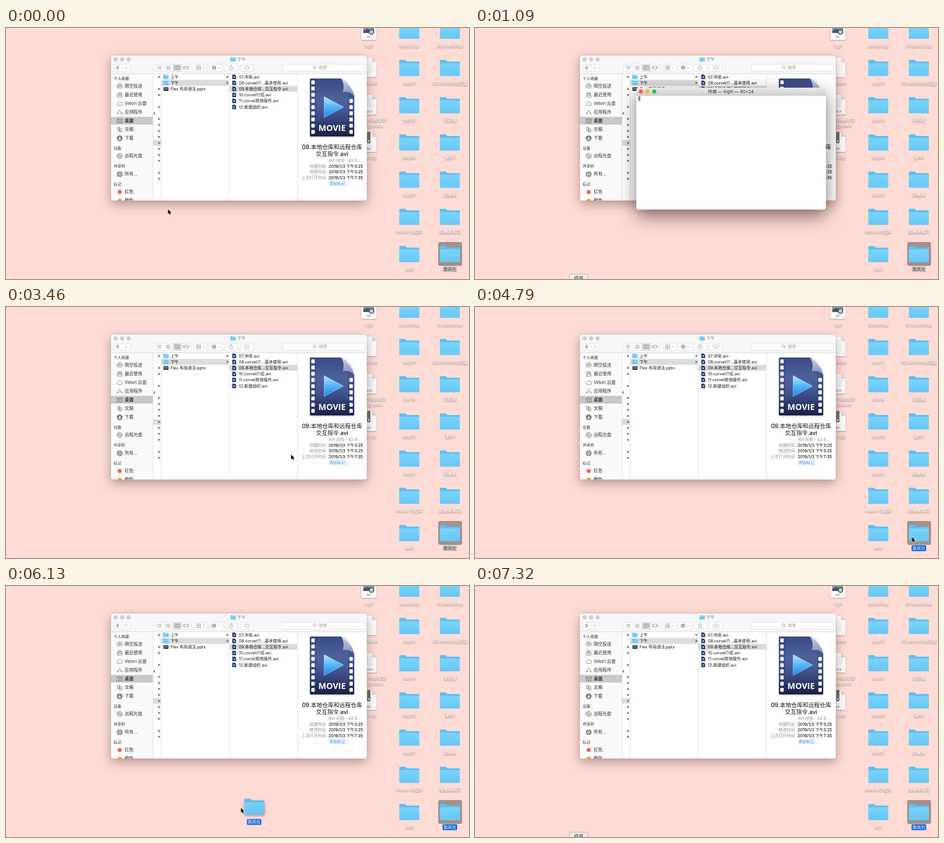
Animation of 1016x551 px, one loop 8 s. Source, as an HTML page with a canvas:

```html
<!DOCTYPE html>
<html lang="zh">
<head>
<meta charset="utf-8">
<title>Desktop</title>
<style>
html, body { margin: 0; width: 100%; height: 100%; overflow: hidden; background: #fedcd6; }
canvas { display: block; }
</style>
</head>
<body>
<canvas id="stage" width="1016" height="551"></canvas>
<script>
const c = document.getElementById('stage').getContext('2d');
const LOOP = 8000;
const SANS = 'Inter, "Noto Sans CJK SC", "Noto Sans CJK", sans-serif';
const BLUE = '#1167d8', GREY = '#7c7c7c', SOFT = '#9a9a9a';

// ---- helpers ----
function text(s, x, y, size = 9, color = '#151515', align = 'left', weight = 400, font = SANS) {
  c.font = `${weight} ${size}px ${font}`;
  c.textAlign = align;
  c.fillStyle = color;
  c.fillText(s, x, y + size * 0.36);
}
function paint(path, fill, stroke, width = 1) {
  if (fill) { c.fillStyle = fill; c.fill(path); }
  if (stroke) { c.strokeStyle = stroke; c.lineWidth = width; c.stroke(path); }
}
function box(x, y, w, h, fill, r = 0, stroke) {
  const p = new Path2D();
  p.roundRect(x, y, w, h, r);
  paint(p, fill, stroke);
}
function disc(x, y, r, fill, stroke, width) {
  const p = new Path2D();
  p.arc(x, y, r, 0, 7);
  paint(p, fill, stroke, width);
}
function shape(x, y, d, fill, stroke, width) {
  c.save();
  c.translate(x, y);
  paint(new Path2D(d), fill, stroke, width);
  c.restore();
}
function fade(y0, y1, ...colors) {
  const g = c.createLinearGradient(0, y0, 0, y1);
  colors.forEach((k, i) => g.addColorStop(i / (colors.length - 1), k));
  return g;
}
function shadowed(color, blur, dy, draw) {
  c.save();
  c.shadowColor = color;
  c.shadowBlur = blur;
  c.shadowOffsetY = dy;
  draw();
  c.restore();
}
const stepAt = (keys, t) => keys.filter(k => k[0] <= t).pop() || [];

// ---- desktop ----
function folder(x, y, scale = 1) {
  c.save();
  c.translate(x, y);
  c.scale(scale, scale);
  paint(new Path2D('M-22 16V-16Q-22-18-20-18H-10Q-8-18-7-16L-6-14.5H20Q22-14.5 22-12.5V16Z'), '#62bfec');
  box(-22, -10.5, 44, 28, fade(-10, 17, '#78d4fc', '#69c8f5'), 1.5);
  c.restore();
}
function label(s, x, y, align = 'center') {
  shadowed('rgba(70,35,30,.75)', 2.5, 1, () => text(s, x, y, 9.4, '#fff', align, 600));
}
function pill(s, x, y, fill, color) {
  box(x - 16, y - 6.5, 32, 13, fill, 2);
  text(s, x, y, 9.4, color, 'center', 500);
}
function page(y, kind) {
  shadowed('rgba(90,50,45,.45)', 3, 1, () =>
    shape(780, y, 'M0 0H23L33 10V43H0Z', '#fdfdfd'));
  shape(780, y, 'M23 0V10H33Z', '#d9d9d9');
  text(kind, 796, y + 37, 6, '#777', 'center', 500);
}
const columns = [
  [885, ['bootstrap', 'day01', 'day19', 'day20', 'day21', 'movie 小程序', 'MUI']],
  [974, ['01.bootstrap', '02.bootstrap页面', '青石榴', '课件1', '周晚禾', '周晚禾练习', '歌岚社']],
];
function desktop(t) {
  c.fillStyle = '#fedcd6';
  c.fillRect(0, 0, 1016, 551);

  page(-17, 'GIF');
  box(784, -6, 24, 17, '#7f93ad');
  shape(784, -6, 'M0 17V12L9 8L24 14V17Z', '#4a5566');
  disc(802, 9, 5, '#c6cbd3', '#4b4f58', 2);
  label('1.gif', 796, 39.5);
  page(65, '');
  label('AB.exe', 815, 121.5, 'right');
  page(147, 'DOCX');
  for (let i = 0; i < 6; i++) box(785, 155 + i * 3.5, 22, 0.7, '#cdd3e2');
  label('2018新年学', 834, 202.5, 'right');
  label('平台.docx', 827, 214.5, 'right');
  page(229, 'ZIP');
  box(792.5, 228, 7, 25, '#555', 2);
  for (let i = 0; i < 8; i++) box(i % 2 ? 796 : 793.5, 229 + i * 2.5, 2.5, 1.2, '#ccc');
  box(794.5, 246, 3, 5, '#ddd', 1);
  label('课件.zip', 813, 285, 'right');

  box(949, 470.5, 51, 51, '#a3918e', 3, '#94827f');
  for (const [x, names] of columns) {
    names.forEach((name, i) => {
      const y = 6.3 + i * 81.7;
      folder(x, y);
      if (name !== '歌岚社') label(name, x, y + 33.3);
    });
  }
  if (t < 4790) pill('歌岚社', 974, 529.5, '#d2c9c7', '#3c3c3c');
  else pill('歌岚社', 974, 529.5, BLUE, '#fff');
}

// ---- file browser ----
const sidebar = [
  ['隔空投送', 128], ['最近使用', 147], ['Velori 云盘', 166], ['应用程序', 185], ['桌面', 204],
  ['文稿', 223], ['下载', 242], ['远程光盘', 281], ['所有...', 321], ['红色', 360], ['橙色', 379],
];
const icons = [
  'M-2.5 5A5.8 5.8 0 1 1 2.5 5M-2 3A3.7 3.7 0 1 1 2 3M-1 1A1.6 1.6 0 1 1 1 1M0 0V5',
  'M-5 5V1L-3.5-5H3.5L5 1V5ZM-5 1.5H5M-3-3H3M-3.5-1H3.5',
  'M-4 4A2.8 2.8 0 0 1-4-1.2A3.8 3.8 0 0 1 3-2.2A3.1 3.1 0 0 1 3.6 4Z',
  'M-5 5L0-5L5 5M-6.5 2H-1M2 2H6.5',
  'M-6-4.5H6V4.5H-6ZM-6-2.5H6M-4 2.5H4M-4 0H4',
  'M-5-5H0V2H-5ZM-1.5-3H2.5L5-0.5V5H-1.5ZM0 0H3M0 2.5H3.5',
];
function sideIcon(i, y) {
  if (i < 6) shape(249.5, y, icons[i], null, GREY, 1);
  else if (i === 6) {
    disc(249.5, y, 6.3, GREY);
    shape(249.5, y, 'M0-3.5V3M-2.8 0.5L0 3.2L2.8 0.5', null, '#fff', 1.4);
  } else if (i === 7) {
    disc(249.5, y, 6, '#ddd', GREY);
    disc(249.5, y, 2, '#fafafa', GREY);
    shape(249.5, y, 'M-4.5-3L-1.5-1M4.5 3L1.5 1', null, GREY);
  } else if (i === 8) {
    disc(249.5, y, 6.3, GREY);
    shape(249.5, y, 'M-5-2Q0 1 5-2M-5 2Q0-1 5 2M0-6Q-4 0 0 6M0-6Q4 0 0 6', null, '#eee', 0.9);
  } else disc(249.5, y, 4.6, i === 9 ? '#fc605b' : '#fba32c');
}
const triangle = (x, y) => shape(x, y, 'M-2-3L3 0L-2 3Z', '#777');

function toolbar() {
  for (const x of [240.5, 255, 269]) disc(x, 69, 4.3, '#d0d0d0', '#bdbdbd', 0.7);
  folder(498.5, 69, 0.26);
  text('下午', 507, 69, 9.5, '#858585');

  const button = (x, w) => box(x + 0.5, 79.5, w, 16, '#fdfdfd', 3, '#dfdfdf');
  for (const [x, w] of [[236, 37], [325, 80], [412, 29], [446, 29], [480, 28], [514, 28]]) button(x, w);
  button(606, 180);
  box(366, 80, 19, 15, '#dcdcdc');
  for (const x of [254.5, 346, 366, 385]) box(x, 80, 0.8, 15, '#dfdfdf');
  shape(245, 87, 'M2-4L-2 0L2 4', null, '#555', 1.3);
  shape(263, 87, 'M-2-4L2 0L-2 4', null, '#c4c4c4', 1.2);
  for (let i = 0; i < 4; i++) {
    box(333 + (i % 2) * 4.2, 83.5 + (i >> 1) * 4.2, 2.6, 2.6, SOFT);
    box(351, 83.3 + i * 2.5, 10, 0.9, SOFT);
  }
  shape(375.5, 87, 'M-5.5-3.5H5.5V3.5H-5.5ZM-1.8-3.5V3.5M1.8-3.5V3.5', null, '#808080', 0.9);
  shape(395, 87, 'M-2.5-3.5H2.5V3.5H-2.5ZM-6-3.5V3.5M-4.3-3.5V3.5M4.3-3.5V3.5M6-3.5V3.5', null, SOFT, 0.9);
  for (let i = 0; i < 9; i++) box(418 + (i % 3) * 3.6, 82.5 + (i / 3 | 0) * 3.6, 2.3, 2.3, SOFT);
  disc(456.5, 87, 2.7, null, '#858585', 1.7);
  for (let a = 0; a < 8; a++) {
    disc(456.5 + 4.2 * Math.cos(a * Math.PI / 4), 87 + 4.2 * Math.sin(a * Math.PI / 4), 0.8, '#858585');
  }
  for (const x of [434, 468]) shape(x, 87, 'M-2.3-1L0 1.3L2.3-1', null, SOFT);
  shape(494, 87, 'M-1.5-1.5H-3.5V4.5H3.5V-1.5H1.5M0 1.5V-5.5M-2-3.5L0-5.5L2-3.5', null, SOFT, 0.9);
  shape(528, 87, 'M-6 0L-3-3.2H4Q5.5-3.2 5.5-1.7V1.7Q5.5 3.2 4 3.2H-3Z', null, SOFT, 0.9);
  disc(677, 86, 3, null, SOFT);
  shape(679, 88, 'M0 0L3 3', null, SOFT);
  text('搜索', 686, 87, 9.5, '#a6a6a6');
}

function movieIcon() {
  shadowed('rgba(0,0,0,.35)', 4, 1, () =>
    shape(667, 111, 'M2 0H68Q90 14 97 38V125Q97 127 95 127H2Q0 127 0 125V2Q0 0 2 0Z',
      fade(0, 127, '#35447f', '#43568f', '#364680', '#1b2145')));
  box(681, 112, 70, 125, fade(112, 237, 'rgba(120,145,205,.08)', 'rgba(120,145,205,.22)', 'rgba(10,15,40,.15)'));
  for (let i = 0; i < 9; i++) {
    const y = 115 + i * 13.6;
    box(670, y, 7.5, 8.5, '#f6f7fa', 1.5);
    if (i > 2) box(753.5, y, 7.5, 8.5, '#f6f7fa', 1.5);
  }
  shape(667, 111, 'M68 0Q77 12 72 30Q87 27 97 38Q92 15 68 0Z', fade(0, 38, '#cdd4e6', '#7e8cb8'));
  shape(698, 150.5, 'M0 0L43 23L0 46Z', fade(0, 46, '#b5e6ff', '#55b5f8', '#2387e4'), '#a9dcfb', 0.7);
  text('MOVIE', 715.5, 219.5, 18.3, '#fff', 'center', 700, '"Open Sans", sans-serif');
}

function browser() {
  shadowed('rgba(65,30,25,.38)', 23, 8, () => box(230, 60, 562, 319, '#fff', 5));
  c.save();
  const frame = new Path2D();
  frame.roundRect(230, 60, 562, 319, 5);
  c.clip(frame);
  box(230, 60, 562, 40, '#f7f7f7');
  box(230, 100, 562, 1, '#d2d2d2');
  box(230, 101, 92, 278, '#fafafa');
  toolbar();

  for (const [s, y] of [['个人收藏', 111], ['设备', 264.5], ['共享的', 303.5], ['标记', 343]]) {
    text(s, 236.5, y, 8.3, '#6f6f6f', 'left', 600);
  }
  box(230, 195, 92, 17, '#c9c9c9');
  sidebar.forEach(([s, y], i) => {
    sideIcon(i, y);
    text(s, 260.5, y, 9.7, '#2d2d2d', 'left', i === 4 ? 600 : 400);
  });
  for (const x of [322, 340, 489.5, 639]) box(x, 101, 1, 278, '#dcdcdc');

  box(323, 246, 17, 12.5, '#dcdcdc');
  for (const row of [0, 2, 3, 5, 7, 8, 9, 10, 11, 12, 13, 14, 16, 17]) triangle(336, 107.5 + row * 13.15);
  text('x', 323, 187, 9);

  box(341, 114, 148.5, 13, '#dcdcdc');
  folder(351, 107.3, 0.27);
  folder(351, 120.5, 0.27);
  text('上午', 361, 107.3);
  text('下午', 361, 120.5);
  triangle(486, 107.3);
  triangle(486, 120.5);
  box(345.5, 130, 11, 8, '#333', 1);
  box(347, 131.5, 8, 4, '#777');
  text('Flex 布局语法.pptx', 361, 134);

  box(490.5, 127, 148.5, 13, '#dcdcdc');
  ['07.冲突.avi', '08.corvel介...基本使用.avi', '09.本地仓库...交互指令.avi',
    '10.corvel介绍.avi', '11.corvel其他操作.avi', '12.新建组织.avi'].forEach((s, i) => {
    const y = 107.3 + i * 13.2;
    shape(496.5, y - 5, 'M0 0H6L8.5 3V10H0Z', '#2c3d70');
    shape(499.5, y - 2, 'M0 0L4 2.5L0 5Z', '#9fd6fa');
    text(s, 511, y);
  });

  movieIcon();
  text('09.本地仓库和远程仓库', 715.5, 261.5, 12.5, '#111', 'center', 500);
  text('交互指令.avi', 715.5, 276.5, 12.5, '#111', 'center', 500);
  text('AVI 视频－42.9...', 708, 291, 8.8, '#9a9a9a', 'left', 500);
  [['创建时间', '3:25'], ['修改时间', '3:25'], ['上次打开时间', '7:35']].forEach(([name, hour], i) => {
    const y = 303.5 + i * 12.4;
    text(name, 702, y, 9, '#8f8f8f', 'right', 500);
    text('2019/1/3 下午' + hour, 708, y, 8.9, '#151515', 'left', 500);
  });
  text('添加标记...', 709, 341.5, 8.9, '#1a7ff0');
  c.restore();
  box(230, 60, 562, 319, null, 5, 'rgba(90,60,60,.2)');
}

// ---- terminal ----
function terminal(t) {
  const ready = t >= 1390, hover = t >= 2870;
  const mono = (s, y) => text(s, 358, y, 8.46, '#111', 'left', 400, '"DejaVu Sans Mono", monospace');
  shadowed('rgba(30,10,10,.55)', 38, 14, () => box(354, 131, 416, 267.5, '#fff', 5));
  box(354, 131, 416, 17, fade(131, 148, '#e9e9e9', '#d1d1d1'), [5, 5, 0, 0]);
  box(354, 147.5, 416, 0.8, '#aaa');
  ['#fc5b57', '#fdbc2e', '#27c83f'].forEach((color, i) => {
    const x = 364 + i * 14.7;
    disc(x, 139.5, 4.4, color, 'rgba(0,0,0,.15)', 0.6);
    if (hover) shape(x, 139.5, ['M-2-2L2 2M2-2L-2 2', 'M-2.5 0H2.5', 'M-2.5 0H2.5M0-2.5V2.5'][i], null, 'rgba(70,20,0,.75)', 1);
  });
  if (!ready) {
    text('终端 — login — 80×24', 561.5, 139.5, 9.5, '#333', 'center');
    box(358, 149.5, 5, 10.5, '#8f8f8f');
    return;
  }
  shape(512, 140, 'M-5 0L0-5L5 0H3.5V5H-3.5V0Z', '#dcc9a3', '#8a6a45', 0.9);
  box(510.8, 141, 2.4, 4, '#8a5a36');
  text('kit — login — 80×24', 520, 139.5, 9.5, '#333');
  mono('Last login: Thu Jan  3 19:50:41 on ttys000', 155);
  mono('KIT:~ kit$', 165);
  box(414, 160, 5, 10.2, '#8f8f8f');
}

// ---- pointer and dragged folder: [time, ...state], held until the next entry ----
const pointer = [
  [0, 355, 397], [150, 336, 452], [350],
  [1530, 236, 530], [1680, 300, 470], [1830, 410, 390, 'beam'], [1980, 490, 335, 'beam'],
  [2130, 528, 309, 'beam'], [2280, 455, 230, 'beam'], [2430, 395, 172, 'beam'], [2570, 378.5, 156, 'beam'],
  [2720, 370, 144], [2870, 366, 140], [3310, 364, 139],
  [3460, 625, 323], [3610, 690, 370], [3760, 770, 420], [3900, 850, 465], [4050, 910, 490],
  [4200, 940, 500], [4350, 953, 503], [4500, 958, 504],
  [5240, 938, 488], [5390, 825, 462], [5540, 685, 474], [5680, 584, 490], [5830, 556, 492],
  [5980, 535, 489], [6120, 515, 486], [6270, 341, 484],
  [6420, 297, 497], [6720, 263, 510], [6870, 246, 524], [7020, 234, 540], [7170],
];
const dragged = [
  [5240, 960, 484], [5390, 850, 454], [5540, 712, 474], [5680, 610, 491], [5830, 584, 492],
  [5980, 563, 489], [6120, 545, 485], [6270, 532, 483],
  [6420, 326, 493], [6720, 308, 501], [6870, 288, 516], [7020, 266, 532], [7170],
];
function ghost(t) {
  const [, x, y] = stepAt(dragged, t);
  if (!x) return;
  c.save();
  c.globalAlpha = 0.93;
  shadowed('rgba(120,60,50,.35)', 6, 2, () => folder(x, y));
  pill('歌岚社', x - 0.5, y + 33, BLUE, '#fff');
  c.restore();
}
function cursor(t) {
  const [, x, y, kind] = stepAt(pointer, t);
  if (!x) return;
  if (kind) {
    const beam = 'M-2.5-6Q0-6 0-4.5Q0-6 2.5-6M0-4.5V4.5M-2.5 6Q0 6 0 4.5Q0 6 2.5 6M-1.5 2H1.5';
    shape(x, y, beam, null, '#fff', 2);
    shape(x, y, beam, null, '#111', 1);
  } else {
    const arrow = 'M0.5 1V11.5L3 9.3L4.8 13.3L6.6 12.5L4.9 8.6H8.2Z';
    shape(x, y, arrow, null, '#fff', 1.4);
    shape(x, y, arrow, '#000');
  }
}
function tooltip() {
  box(207, 540.5, 41, 20, '#f1e8e6', 3, '#b5a6a3');
  text('终端', 227.5, 549.5, 10, '#333', 'center');
}

function frame(now) {
  const t = now % LOOP;
  desktop(t);
  browser();
  if (t >= 1090 && t < 3460) terminal(t);
  if ((t >= 800 && t < 1530) || t >= 7320) tooltip();
  ghost(t);
  cursor(t);
  requestAnimationFrame(frame);
}
frame(0);
</script>
</body>
</html>
```
